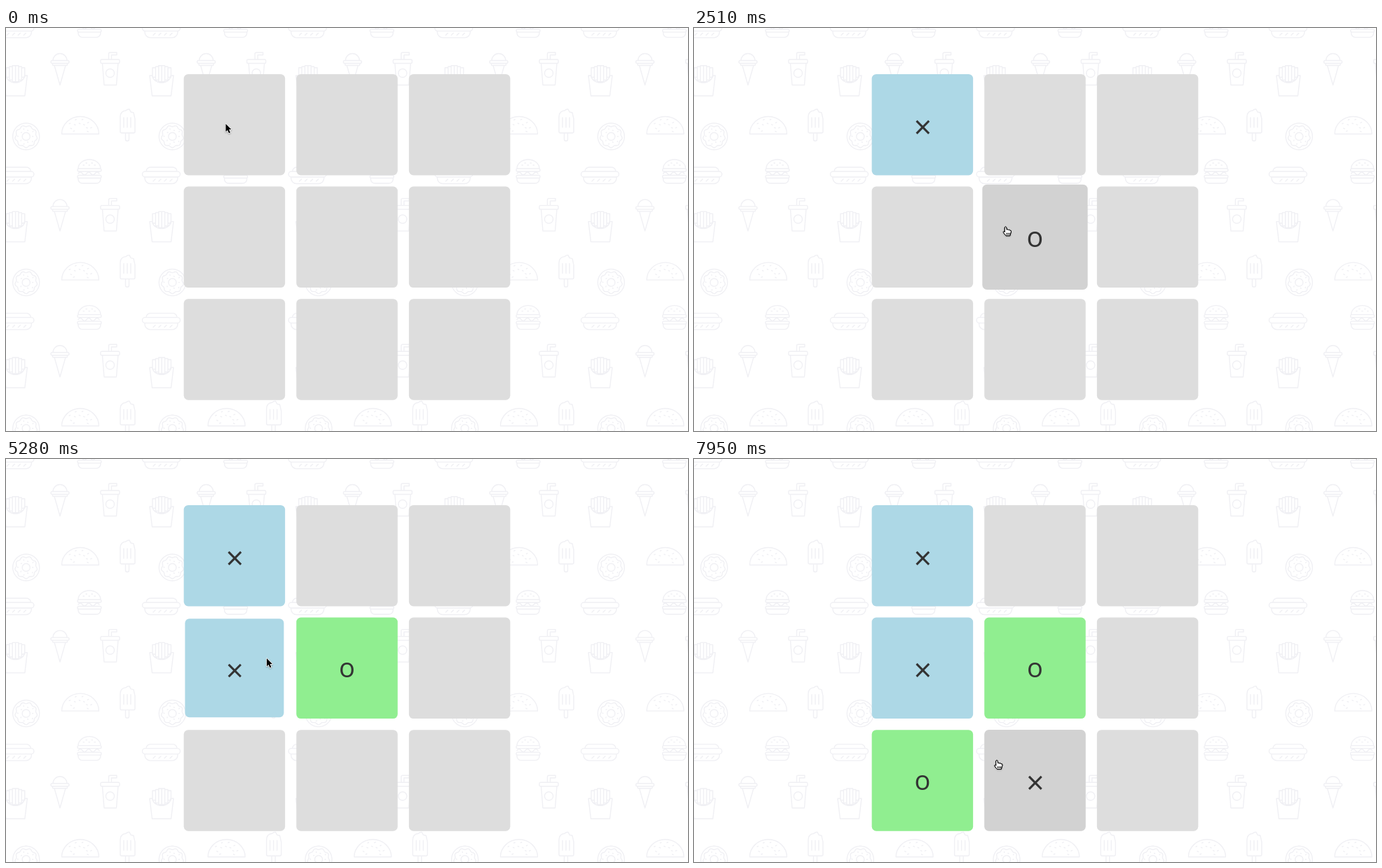
Animation, 973 px wide and 576 px high, one loop 8000 ms. Source, as an HTML page with a canvas:

```html
<!DOCTYPE html>
<html lang="en">
<head>
<meta charset="utf-8">
<title>Tic-tac-toe</title>
<style>
  html, body { margin: 0; width: 100%; height: 100%; overflow: hidden; background: #fff; }
  canvas { display: block; }
</style>
</head>
<body>
<canvas id="stage" width="973" height="576"></canvas>
<script>
const ctx = document.getElementById('stage').getContext('2d');
const LOOP = 8000, TILE = 208.65, CELL = 144.5, STEP = 160.6;
const clamp = v => Math.max(0, Math.min(1, v));
const easeOut = (u, power) => 1 - (1 - clamp(u)) ** power;

// Wallpaper: one repeat of line-drawn snacks, built from simple shapes
const wallpaper = new Path2D();
const add = d => wallpaper.addPath(new Path2D(d));
const box = (x, y, w, h, r = 0) => wallpaper.roundRect(x, y, w, h, r);
const line = (x, y, dx, dy) => add(`M${x} ${y}l${dx} ${dy}`);
const repeat = (n, draw) => { for (let i = 0; i < n; i++) draw(i); };

function ring(x, y, radius) {
  const steps = 90;
  repeat(steps + 1, i => {
    const a = i / steps * 2 * Math.PI, r = radius(a);
    wallpaper[i ? 'lineTo' : 'moveTo'](x + r * Math.cos(a), y + r * Math.sin(a));
  });
}

function dome(x, base, rx, ry) {
  add(`M${x - rx} ${base}a${rx} ${ry} 0 0 1 ${2 * rx} 0z`);
}

function iceCream() {
  dome(77, 46.5, 10, 10);
  box(64, 46.5, 26, 4, 2);
  box(66.5, 50.5, 21, 3, 1);
  add('M69 53.5L77 81.5 85 53.5');
}

function drink() {
  box(135, 45, 27, 5.5, 1.5);
  add('M137.5 50.5l2.5 31h17.5l2.5-31M146.5 45V37q0-2 2-2H158v3.500h-7.500V45');
  ring(148.5, 64.5, () => 6);
}

function fries() {
  add('M209 68h-4l3.500 29h27l3.500-29h-4a13 10 0 0 1-26 0');
  repeat(6, i => {
    const x = 209 + i * 4.4, top = 53 + Math.abs(i - 2.5) * 1.5;
    box(x, top, 4.4, 68 + 9 * Math.sin((i + 0.5) / 6 * Math.PI) - top);
  });
}

function donut() {
  const x = 28.7, y = 155;
  ring(x, y, () => 19);
  ring(x, y, () => 5.5);
  ring(x, y, a => 15 + Math.sin(a * 9));
  repeat(10, i => {
    const r = 9 + i % 2 * 2.5;
    line(x + r * Math.cos(i * 0.63), y + r * Math.sin(i * 0.63), Math.cos(i * 2), Math.sin(i * 2));
  });
}

function taco() {
  dome(106, 151.5, 26.5, 25);
  repeat(12, i => {
    const a = Math.PI + (i + 0.5) / 12 * Math.PI, r = 10 + i * 5 % 11;
    line(106 + r * Math.cos(a), 149 + r * Math.sin(a), 1.5, i % 2 ? 0.7 : -0.7);
  });
}

function iceLolly() {
  add('M163 148V127q0-8 8-9 2-2 5-2l2 4 4 1 2 9v18q0 2-2 2h-17q-2 0-2-2z');
  box(170.5, 150, 5, 11.5, [0, 0, 2.5, 2.5]);
  repeat(3, i => line(168 + i * 5, 128, 0, 14));
}

function burger() {
  dome(119, 201, 16, 13);
  box(102, 201, 34, 4, 2);
  add('M103 208q3-4 6 0t6 0 6 0 6 0 6 0');
  box(102, 210.5, 34, 4, 2);
  box(103, 214.5, 32, 7.5, [0, 0, 6, 6]);
  repeat(5, i => line(110 + i * 4, 196 - i % 2 * 3, 1.5, 0));
}

function hotDog() {
  box(200, 199, 44, 6, [7, 7, 0, 0]);
  box(194.5, 205, 54, 8, 4);
  box(198, 213, 47, 9.5, [0, 0, 8, 8]);
  repeat(4, i => line(210 + i * 8, 219, 3, -3));
}

[iceCream, drink, fries, donut, taco, iceLolly, burger, hotDog].forEach(draw => draw());

const arrow = new Path2D('M0 0V11.200L2.600 8.900 4.500 13.300 6.500 12.400 4.600 8.100H8Z');
const hand = new Path2D('M-1.200 7.500V1.200Q0-.5 1.200 1.200L1.700 4.600Q3 3.500 4 5 5.300 3.700 6 5.600 7.900 5 8 7.200L6.300 13.200H.5L-3 8.800Q-4 6.700-1.200 7.500ZM1.500 9.500v2m2-2v2m2-2v2');

const moves = [
  { cell: 0, mark: '×', hover: 500, click: 820 },
  { cell: 4, mark: 'o', hover: 1870, click: 2760 },
  { cell: 3, mark: '×', hover: 3730, click: 5120 },
  { cell: 6, mark: 'o', hover: 6180, click: 6740 },
  { cell: 7, mark: '×', hover: 7950, click: Infinity }
];
const marks = {
  '×': { color: '#add8e6', font: '45px "Open Sans", sans-serif' },
  'o': { color: '#90ee90', font: '500 38px "Open Sans", sans-serif' }
};

// Pointer travel: each leg starts where the previous one ended
const legs = [
  { from: 1180, to: 1380, x: 373.5, y: 196.5, power: 1, lift: 0 },
  { from: 1560, to: 2510, x: 444.5, y: 282, power: 3, lift: 0 },
  { from: 3360, to: 4370, x: 372, y: 284.5, power: 3, lift: 0 },
  { from: 5880, to: 6580, x: 327, y: 423, power: 3, lift: 0 },
  { from: 7260, to: 7950, x: 432, y: 428.5, power: 1, lift: 14 }
];

function pointerAt(t) {
  let x = 313.5, y = 136.5;
  for (const leg of legs) {
    const k = easeOut((t - leg.from) / (leg.to - leg.from), leg.power);
    x += (leg.x - x) * k;
    y += (leg.y - y) * k - leg.lift * Math.sin(k * Math.PI);
  }
  return [x, y];
}

function cellScale(move, t) {
  if (!move) return 1;
  if (t < move.click) return 1 + 0.04 * easeOut((t - move.hover) / 160, 2);
  const u = clamp((t - move.click) / 320);
  return 1 + 0.04 * (1 - u) - 0.044 * Math.sin(u * Math.PI);
}

function drawWallpaper() {
  ctx.strokeStyle = '#f0f0f4';
  ctx.lineWidth = 1.4;
  ctx.lineJoin = ctx.lineCap = 'round';
  for (let row = -1; row < 3; row++) {
    for (let col = -1; col < 5; col++) {
      ctx.save();
      ctx.translate(col * TILE, row * TILE);
      ctx.stroke(wallpaper);
      ctx.restore();
    }
  }
}

function drawMark(mark) {
  ctx.font = marks[mark].font;
  ctx.fillStyle = '#333';
  const ink = ctx.measureText(mark);
  const x = (ink.actualBoundingBoxLeft - ink.actualBoundingBoxRight) / 2;
  const y = (ink.actualBoundingBoxAscent - ink.actualBoundingBoxDescent) / 2;
  ctx.fillText(mark, x, y + 3.1);
}

function drawCell(index, t) {
  const move = moves.find(m => m.cell === index && t >= m.hover);
  const taken = move && t >= move.click;
  const scale = cellScale(move, t);
  ctx.save();
  ctx.translate(486.5 + (index % 3 - 1) * STEP, 298.8 + (Math.floor(index / 3) - 1) * STEP);
  ctx.scale(scale, scale);
  ctx.fillStyle = !move ? '#ddd' : taken ? marks[move.mark].color : '#d2d2d2';
  ctx.beginPath();
  ctx.roundRect(-CELL / 2, -CELL / 2, CELL, CELL, 6.4);
  ctx.fill();
  if (move) drawMark(move.mark);
  ctx.restore();
}

function drawPointer(t) {
  const [x, y] = pointerAt(t);
  const pointing = moves.some(m => t >= m.hover && t < m.click);
  const shape = pointing ? hand : arrow;
  ctx.save();
  ctx.translate(x, y + (pointing ? 1.7 : 0.5));
  ctx.strokeStyle = pointing ? '#000' : '#fff';
  ctx.fillStyle = pointing ? '#fff' : '#000';
  ctx.lineWidth = pointing ? 1 : 1.6;
  ctx.shadowColor = 'rgba(0,0,0,.3)';
  ctx.shadowBlur = 2;
  ctx.shadowOffsetY = 1;
  ctx.stroke(shape);
  ctx.shadowColor = 'transparent';
  ctx.fill(shape);
  if (pointing) ctx.stroke(shape);
  ctx.restore();
}

const start = performance.now();
function frame() {
  const t = (performance.now() - start) % LOOP;
  ctx.fillStyle = '#fff';
  ctx.fillRect(0, 0, 973, 576);
  drawWallpaper();
  repeat(9, i => drawCell(i, t));
  drawPointer(t);
  requestAnimationFrame(frame);
}
frame();
</script>
</body>
</html>
```
